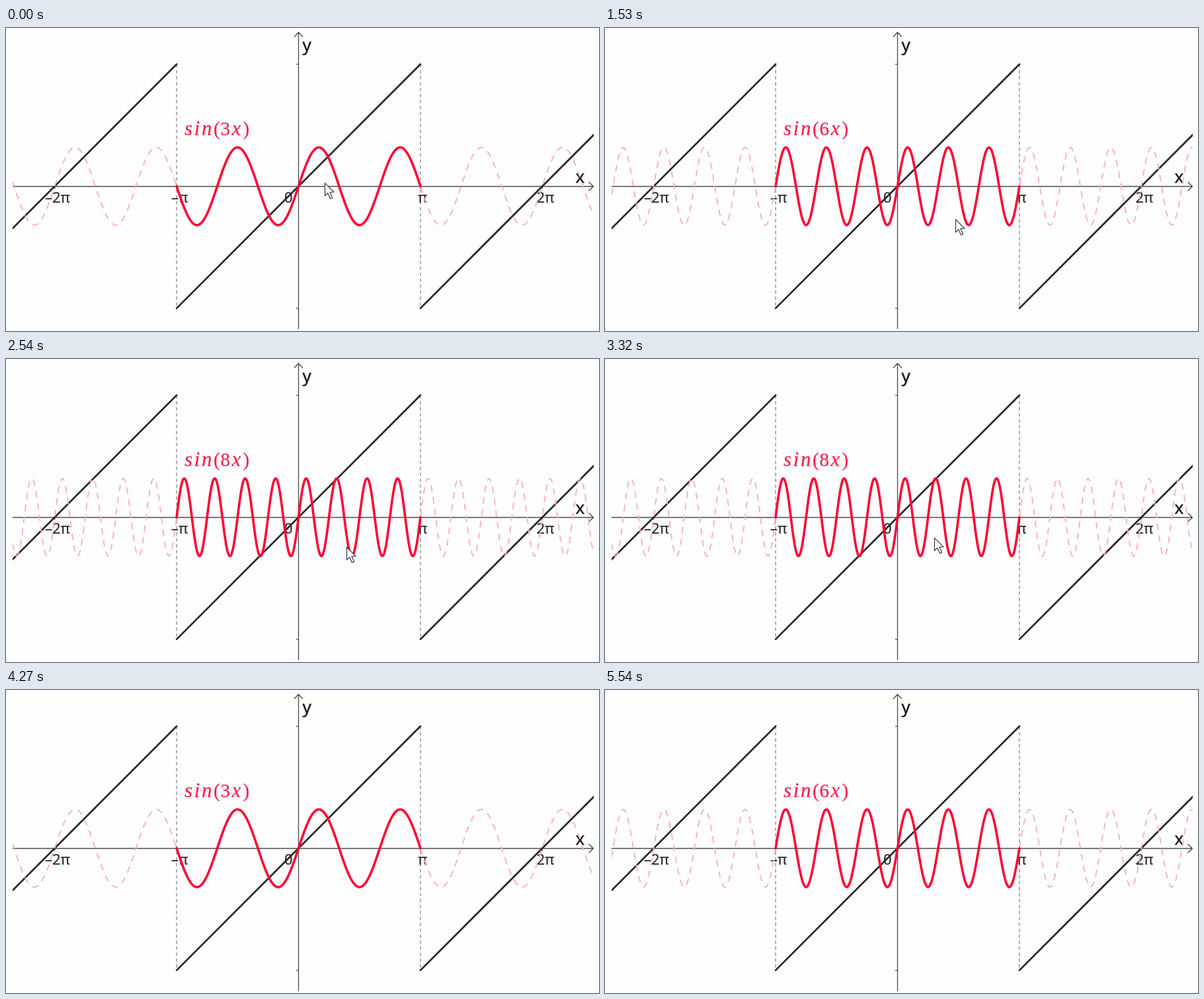
An HTML page that plays this animation: 897 by 458 pixels, repeating every 5.64 s.

```html
<!DOCTYPE html>
<html lang="en">
<head>
<meta charset="utf-8">
<title>Sine waves and a sawtooth</title>
<style>
  html, body { margin: 0; width: 100%; height: 100%; overflow: hidden; background: #fefefe; }
  svg { display: block; width: 897px; height: 458px; }
  path { fill: none; }
  .axis { stroke: #484848; stroke-width: 1.3; }
  .jump { stroke: #858585; stroke-width: 1.3; stroke-dasharray: 5 4; }
  .saw { stroke: #262626; stroke-width: 2.7; stroke-linecap: round; }
  .wave { stroke: #ff0033; stroke-width: 3.6; stroke-linejoin: round; stroke-linecap: round; }
  .ghost { stroke: #ffadc6; stroke-width: 1.9; stroke-dasharray: 10 8; }
  .tick { font: 22px "Noto Sans", "Open Sans", sans-serif; fill: #2a2a2a; stroke: #2a2a2a; stroke-width: .2; }
  .name { font: 26px "Noto Sans", "Open Sans", sans-serif; fill: #1a1a1a; stroke: #1a1a1a; stroke-width: .4; }
  .label { font: 29px "Liberation Serif", serif; fill: #fb1c4a; stroke: #fb1c4a; stroke-width: .2; }
  .it { font-style: italic; font-size: 31px; }
  #cursor { fill: #fff; stroke: #2a2a35; stroke-width: 1.1; }
</style>
</head>
<body>
<svg viewBox="0 0 897 458">
  <defs><clipPath id="plot"><rect x="10" y="5" width="879" height="450"/></clipPath></defs>
  <g clip-path="url(#plot)">
    <path id="jumps" class="jump"/>
    <path id="ticks" class="axis"/>
    <path class="axis" d="M10 239.5H888M442.5 455V7M436 13.5L442.5 6.5L449 13.5M881.5 232.7L888.5 239.5L881.5 246.3"/>
    <g class="tick">
      <text x="59" y="264">–2π</text>
      <text x="250" y="264">–π</text>
      <text x="421" y="264">0</text>
      <text x="623" y="264">π</text>
      <text x="802.5" y="264">2π</text>
    </g>
    <g class="name">
      <text x="448.5" y="35">y</text>
      <text x="861.5" y="234">x</text>
    </g>
    <path id="saw" class="saw"/>
    <path id="left" class="ghost"/>
    <path id="right" class="ghost"/>
    <path id="wave" class="wave"/>
  </g>
  <g class="label">
    <text class="it" x="270" y="162" letter-spacing="2.6">sin</text>
    <text x="314" y="162">(</text>
    <text id="count" x="324.5" y="162"></text>
    <text class="it" x="341.5" y="162">x</text>
    <text x="358.5" y="162">)</text>
  </g>
  <path id="cursor" d="M.5 .5V19.5L4.8 15.7L8.4 23.8L11.6 22.4L8 14.4L13.8 13.8Z"/>
</svg>
<script>
const LOOP = 5640, STEP = 500, RESTART = 3540, GLIDE = 300;
const X0 = 442.5, Y0 = 239.2, HALF = 184.4, UNIT = HALF / Math.PI;
const LEFT = 10, RIGHT = 889;

// Pointer stops: arrival time in ms and tip position
const STOPS = [
  { at: 0, x: 482, y: 234 },
  { at: 810, x: 530, y: 280 },
  { at: 1530, x: 530, y: 289 },
  { at: 2540, x: 515, y: 284 },
  { at: 2830, x: 452, y: 236 },
  { at: 3410, x: 518, y: 284 },
  { at: 3820, x: 500, y: 266 },
  { at: 4270, x: 826, y: 458 }
];

const el = id => document.getElementById(id);
const draw = (id, d) => el(id).setAttribute("d", d);

// Counts up every STEP, rests at 8, then starts again from 2
function frequency(t) {
  return t < RESTART
    ? Math.min(8, 3 + Math.floor((t - 30) / STEP + (t < 30)))
    : 2 + Math.floor((t - RESTART) / STEP);
}

function sine(n, from, to) {
  let d = "";
  for (let x = from; ; x = Math.min(x + 1, to)) {
    const y = Y0 - UNIT * Math.sin(n * (x - X0) / UNIT);
    d += (d ? "L" : "M") + x.toFixed(1) + " " + y.toFixed(2);
    if (x >= to) return d;
  }
}

function drawFixed() {
  const top = Y0 - HALF, bottom = Y0 + HALF;
  let saw = "", jumps = "", ticks = "";
  for (const k of [-1, 0, 1]) {
    const mid = X0 + 2 * k * HALF;
    saw += `M${mid - HALF} ${bottom}L${mid + HALF} ${top}`;
  }
  for (const side of [-1, 1]) {
    jumps += `M${X0 + side * HALF} ${top}V${bottom}`;
    ticks += `M439 ${Y0 + side * HALF}H443`;
    for (const k of [1, 2]) ticks += `M${X0 + side * k * HALF} 239.5V243`;
  }
  draw("saw", saw);
  draw("jumps", jumps);
  draw("ticks", ticks);
}

// Rests at each stop, then glides so as to reach the next one on time
function pointerAt(t) {
  const i = STOPS.findIndex(s => s.at > t);
  if (i < 0) return null;
  const a = STOPS[i - 1], b = STOPS[i];
  const leave = Math.max(a.at, b.at - GLIDE);
  const u = Math.max(0, (t - leave) / (b.at - leave));
  const mix = (p, q) => Math.round(p + (q - p) * u);
  return [mix(a.x, b.x), mix(a.y, b.y)];
}

let shown = 0;
function render(t) {
  const n = frequency(t);
  if (n !== shown) {
    shown = n;
    el("count").textContent = n;
    draw("left", sine(n, LEFT, X0 - HALF));
    draw("wave", sine(n, X0 - HALF, X0 + HALF));
    draw("right", sine(n, X0 + HALF, RIGHT));
  }
  const p = pointerAt(t), cursor = el("cursor");
  cursor.style.display = p ? "" : "none";
  if (p) cursor.setAttribute("transform", `translate(${p})`);
}

drawFixed();
const start = performance.now();
function tick() {
  render((performance.now() - start) % LOOP);
  requestAnimationFrame(tick);
}
tick();
</script>
</body>
</html>
```
